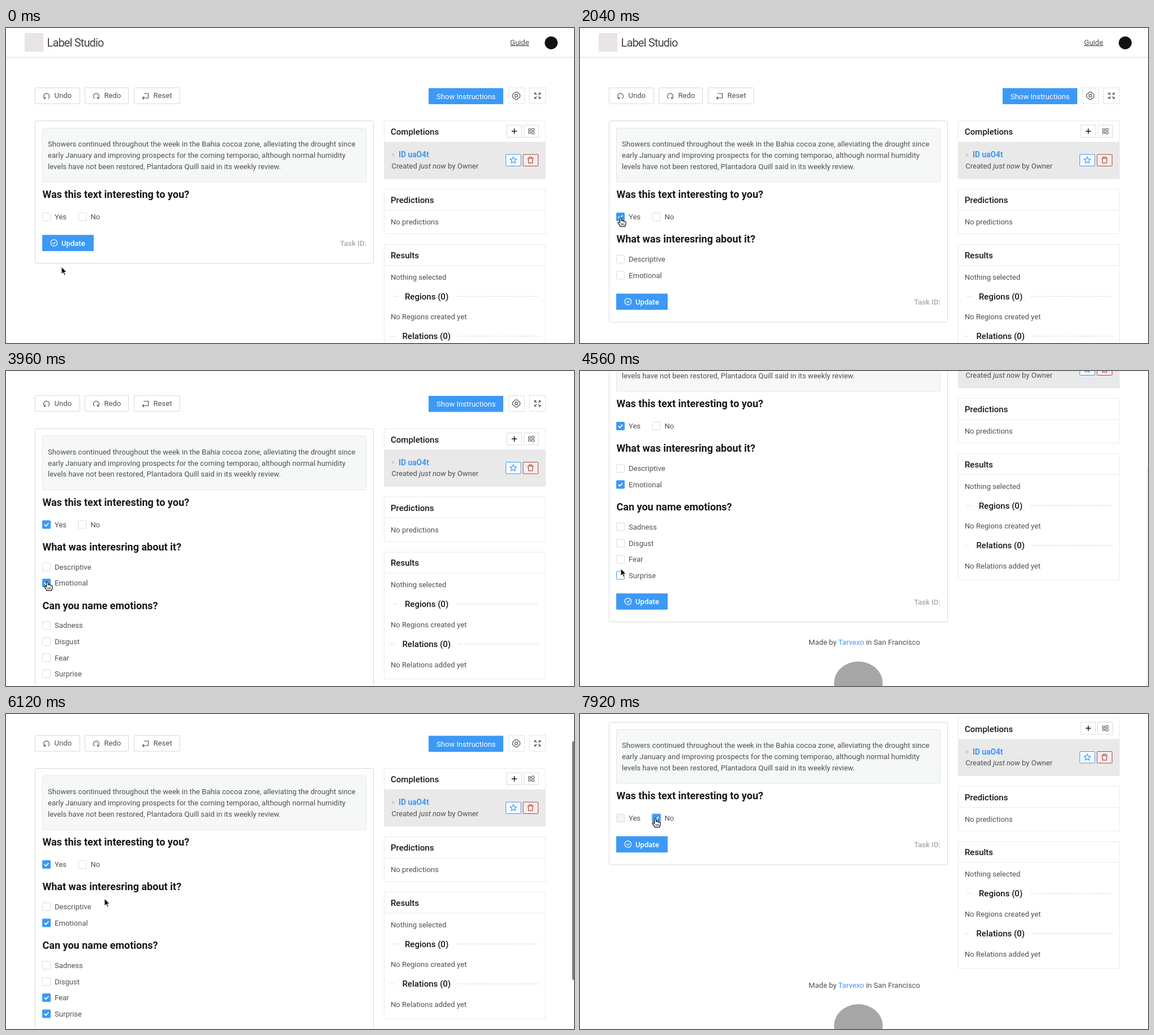
An HTML page for the animation above (8000 ms loop, 1004 px wide and 558 px high).

```html
<!DOCTYPE html>
<html lang="en">
<head>
<meta charset="utf-8">
<title>Text labeling</title>
<style>
  html, body { margin: 0; width: 100%; height: 100%; overflow: hidden; background: #fff; }
  svg { display: block; width: 1004px; height: 558px; font-family: Roboto, Inter, sans-serif; }
  path, line { fill: none; }
</style>
</head>
<body>
<svg id="stage" viewBox="0 0 1004 558"></svg>
<script>
const BLUE = '#3d99f6', INK = '#505050', DARK = '#181818', EDGE = '#dcdcdc', PALE = '#ebebeb', RED = '#b2473c';
const LOOP = 8000, STEP = 120, VIEW = 592;

// Drawing helpers; a text's y is the middle of its capitals.
const text = (x, y, str, { size = 13.07, fill = INK, weight = 400, extra = '' } = {}) =>
  `<text x="${x}" y="${y + size * .36}" font-size="${size}" fill="${fill}" font-weight="${weight}" ${extra}>${str}</text>`;
const title = (x, y, str) => text(x, y, str, { size: 15, fill: DARK, weight: 500 });
const question = (y, str) => text(64.5, y, str, { size: 18, fill: DARK, weight: 700 });
const rect = (x, y, w, h, fill = '#fff', stroke = 'none', extra = '') =>
  `<rect x="${x}" y="${y}" width="${w}" height="${h}" fill="${fill}" stroke="${stroke}" ${extra}/>`;
const icon = (x, y, d, stroke = INK, width = 1.2, extra = '') =>
  `<path transform="translate(${x} ${y})" d="${d}" stroke="${stroke}" stroke-width="${width}" ${extra}/>`;
const rule = (x1, x2, y, stroke = PALE, dash = '') =>
  `<line x1="${x1}" x2="${x2}" y1="${y}" y2="${y}" stroke="${stroke}" stroke-dasharray="${dash}"/>`;
const toolButton = (x, w, label, d) =>
  rect(x, 106, w, 28, '#fff', '#d6d6d6', 'rx="1"') + icon(x + 20, 120, d) + text(x + 34, 119.7, label);
const panel = (y, h, split, label) =>
  rect(668.5, y, 285, h, '#fff', PALE) + rule(669, 953, split) + title(680, (y + split) / 2 + .5, label);
const divider = (y, left, label, from, to) =>
  rule(left, left + 8, y, '#ccc', '3 2') + title(left + 21, y, label) + rule(from, to, y, '#d0d0d0', '3 2');

// label, box left, row centre, checked from, checked until, group
const OPTIONS = [
  ['Yes', 64.5, 334.5, 1440, 7800, ''],
  ['No', 128, 334.5, 7800, LOOP, ''],
  ['Descriptive', 64.5, 409.5, LOOP, LOOP, 'reason'],
  ['Emotional', 64.5, 438, 3720, 7800, 'reason'],
  ['Sadness', 64.5, 513, LOOP, LOOP, 'emotion'],
  ['Disgust', 64.5, 542, LOOP, LOOP, 'emotion'],
  ['Fear', 64.5, 570.5, 4800, 7800, 'emotion'],
  ['Surprise', 64.5, 599, 5280, 7800, 'emotion'],
].map(([label, x, y, on, off, group]) => ({ label, x, y, on, off, group }));

const choices = group => OPTIONS.filter(o => o.group === group).map(o =>
  `<g id="${o.label}">` +
  rect(o.x - 2.5, o.y - 9.5, 19, 19, BLUE, 'none', 'rx="2" opacity=".18" class="halo"') +
  rect(o.x, o.y - 7, 14, 14, '#fff', EDGE, 'rx="1" class="box"') +
  icon(o.x, o.y - 7, 'M3.3 7l2.8 2.8 4.7-5.3', '#fff', 1.8, 'class="tick"') +
  text(o.x + 21.5, o.y, o.label) + '</g>').join('');

const header =
  rule(0, 1004, 52, '#d4d4d4') + rule(0, 1004, 53, '#eee') +
  rect(33, 9, 33, 33, '#e8e5e4') +
  text(72.5, 26, 'Label Studio', { size: 20, fill: '#444', extra: 'letter-spacing="-.85"' }) +
  text(891, 25, 'Guide', { extra: 'text-decoration="underline"' }) +
  '<circle cx="963.7" cy="26.3" r="11.4" fill="#111"/>';

const toolbar =
  toolButton(51.5, 79, 'Undo', 'M-2.8 5A5 5 0 1 1 2.8 5M-5 5h2.8v-3') +
  toolButton(139.5, 77, 'Redo', 'M-2.8 5A5 5 0 1 1 2.8 5M5 5h-2.8v-3') +
  toolButton(226.5, 80.5, 'Reset', 'M-3-4H5V4H-5M-2.5 1.5L-5 4l2.5 2.5') +
  rect(747, 106.5, 132, 28.5, BLUE, 'none', 'rx="1"') +
  text(761, 120.8, 'Show Instructions', { fill: '#fff' }) +
  rect(888.5, 106, 28, 28, '#fff', '#d0d0d0', 'stroke-dasharray="3 2"') +
  icon(902, 120, 'M-2-6.5h4l.7 2 2 .5 1.8 2.3v3.4L4.7 4l-2 .5-.7 2h-4l-.7-2-2-.5-1.8-2.3v-3.4L-4.7-4l2-.5z' +
    'M0-2.4a2.4 2.4 0 1 1 0 4.8 2.4 2.4 0 0 1 0-4.8') +
  rect(925.5, 106, 28, 28, '#fff', '#d0d0d0', 'stroke-dasharray="3 2"') +
  icon(939.5, 120, 'M-5-2v-3h3M5-2v-3h-3M-5 2v3h3M5 2v3h-3M-5-5l3.5 3.5M5-5L1.5-1.5M-5 5l3.5-3.5M5 5L1.5 1.5');

const card =
  rect(51.5, 164.5, 598, 252.5, '#fff', '#d6d6d6', 'rx="3" id="card"') +
  rect(64.5, 177.5, 572, 95.5, '#f6f8f8', '#e3e6e6', 'rx="2"') +
  ['Showers continued throughout the week in the Bahia cocoa zone, alleviating the drought since',
   'early January and improving prospects for the coming temporao, although normal humidity',
   'levels have not been restored, Plantadora Quill said in its weekly review.',
  ].map((line, i) => text(74, 205.7 + i * 19.7, line)).join('') +
  question(295, 'Was this text interesting to you?') + choices('') +
  '<g id="reason">' + question(373.7, 'What was interesring about it?') + choices('reason') + '</g>' +
  '<g id="emotion">' + question(477.7, 'Can you name emotions?') + choices('emotion') + '</g>' +
  '<g id="actions">' +
  rect(64, 366.5, 91, 28.7, BLUE, 'none', 'rx="1"') +
  icon(84.8, 380.6, 'M0-5.8a5.8 5.8 0 1 1 0 11.6 5.8 5.8 0 0 1 0-11.6M-2.6 0l2 2.1 3.3-3.9', '#fff') +
  text(98, 381, 'Update', { fill: '#fff', weight: 500 }) +
  text(637, 381.7, 'Task ID:', { fill: '#a9a9a9', weight: 500, extra: 'text-anchor="end"' }) + '</g>';

const sidebar = '<g id="sidebar">' +
  panel(164.5, 102.5, 202, 'Completions') +
  rect(668, 202, 286, 65, '#e9e9e9') +
  rect(885.5, 172, 26, 21.5, '#fff', EDGE) + icon(898.5, 182.7, 'M-4.7 0H4.7M0-4.7V4.7', DARK, 1.5) +
  rect(915.5, 172, 26, 21.5, '#fff', EDGE) +
  icon(928.5, 182.7, 'M-5-4h4v3h-4zM1-4.8h4v3.8H1zM-5 1h4v3h-4zM1 1h4v3.8H1z', INK, 1) +
  '<circle cx="684" cy="224.7" r="2.6" fill="#d0d0d0"/>' +
  text(694, 224.5, 'ID uaO4t', { size: 13.8, fill: BLUE, weight: 700 }) +
  text(681.5, 244.2, 'Created <tspan font-style="italic">just now</tspan> by Owner') +
  rect(883.5, 224, 26.5, 20.5, '#f6faff', BLUE, 'rx="1"') +
  icon(896.7, 234, 'M0-5.6l1.7 3.5 3.9.5-2.9 2.7.8 3.9L0 3.1-3.5 5l.8-3.9-2.9-2.7 3.9-.5z', BLUE) +
  rect(914, 224, 26.5, 20.5, '#f3eeee', RED, 'rx="1"') +
  icon(927.2, 234, 'M-5.5-3H5.5M-2.5-3v-2.2h5V-3M-4-3l.5 8.2h7L4-3', RED) +
  panel(285.5, 79, 323, 'Predictions') + text(680, 343.5, 'No predictions') +
  panel(383.5, 224.5, 420.5, 'Results') + text(680, 441, 'Nothing selected') +
  divider(475.3, 684, 'Regions (0)', 797, 939) + text(680, 511.7, 'No Regions created yet') +
  divider(546, 679.5, 'Relations (0)', 799, 942) + text(680, 582.3, 'No Relations added yet') + '</g>';

const footer = '<g id="footer">' +
  text(502.5, 0, `Made by <tspan fill="${BLUE}">Tarvexo</tspan> in San Francisco`, { extra: 'text-anchor="middle"' }) +
  '<ellipse cx="492" cy="72" rx="43" ry="38" fill="#a6a6a6"/></g>';

const pointers =
  '<g id="arrow"><path d="M0 0V13L3 10.2l2.2 5 2-.9L5 9.4H9.2Z" style="fill:#111" stroke="#fff"/></g>' +
  '<g id="hand"><path d="M-1.4 1.3a1.4 1.4 0 0 1 2.8 0V5.5q2.6-.9 3 .8 2.4-.6 2.7 1 2.2-.3 2.2 1.4 0 4-2 7H-.8' +
  'Q-2 12.5-5 9.5q0-2 1.6-1.7l2 1.5Z" style="fill:#fff" stroke="#111" stroke-width="1.2"/>' +
  '<path d="M1 10v3.5M3.4 10v3.5M5.8 10v3.5" stroke="#111"/></g>';

const $ = id => document.getElementById(id);
$('stage').innerHTML = `<g id="page">${header + toolbar + card + sidebar + footer}</g>` +
  rect(1000.7, 0, 5, 0, '#555', 'none', 'id="bar" rx="2"') + pointers;

// Key lists hold [time, ...values].
const SCROLL = [[2040, 0], [2520, 62.5], [4080, 62.5], [4560, 237], [5400, 237], [6120, 68],
  [6360, 68], [6840, 177], [7200, 177], [7560, 157.5]];
const POINTER = [[240, 98, 423], [960, 72, 336], [2640, 72, 336], [3480, 73, 372], [4320, 73, 374],
  [4560, 72, 350], [4680, 72, 334], [4920, 72, 334], [5160, 72, 362], [5520, 72, 362],
  [6120, 174, 327], [6600, 174, 327], [7080, 92, 229], [7200, 92, 229], [7680, 133, 185]];
const BAR = [[2040, 0], [2160, .75], [2640, .75], [3000, 0], [3960, 0], [4080, .75], [4440, .6],
  [4560, .06], [4680, 0], [5400, 0], [5520, .75], [6720, .75], [6960, 0]];

function track(keys, t) {
  const next = keys.findIndex(k => k[0] > t);
  if (next < 1) return keys.at(next).slice(1);
  const a = keys[next - 1], b = keys[next];
  const u = (t - a[0]) / (b[0] - a[0]), ease = u * u * (3 - 2 * u);
  return a.slice(1).map((v, i) => v + (b[i + 1] - v) * ease);
}

const show = (node, on) => { node.style.display = on ? '' : 'none'; };
const move = (node, x, y) => node.setAttribute('transform', `translate(${x} ${y})`);
const parts = OPTIONS.map(o => {
  const g = $(o.label);
  return { box: g.querySelector('.box'), tick: g.querySelector('.tick'), halo: g.querySelector('.halo'),
    width: 24 + g.querySelector('text').getComputedTextLength() };
});

function render(t) {
  const [wanted] = track(SCROLL, t), [x, y] = track(POINTER, t);
  const open = { '': true, reason: t >= 1440 && t < 7800, emotion: t >= 3720 && t < 7800 };
  const grow = (open.reason ? 104 : 0) + (open.emotion ? 160.5 : 0);
  const footY = Math.max(630, 453 + grow);
  const scroll = Math.min(wanted, footY - 480);

  move($('page'), 0, -scroll);
  move($('sidebar'), 0, scroll - wanted); // not yet clamped when the page shrinks
  move($('actions'), 0, grow);
  move($('footer'), 0, footY);
  $('card').setAttribute('height', 252.5 + grow);
  show($('reason'), open.reason);
  show($('emotion'), open.emotion);

  let pointing = false;
  OPTIONS.forEach((o, i) => {
    const { box, tick, halo, width } = parts[i];
    const checked = t >= o.on && t < o.off, fading = t >= o.off && t < o.off + 240;
    const inRow = open[o.group] && x >= o.x && x <= o.x + width;
    const dy = Math.abs(y + scroll - o.y);
    pointing ||= inRow && dy <= 10;
    box.setAttribute('fill', checked ? BLUE : fading ? '#f1f4f4' : '#fff');
    box.setAttribute('stroke', checked || (inRow && dy <= 12.5) ? BLUE : EDGE);
    show(tick, checked);
    show(halo, checked && t - o.on < 240);
  });

  for (const [id, on] of [['arrow', !pointing], ['hand', pointing]]) {
    show($(id), on);
    move($(id), x, y);
  }

  const ratio = VIEW / (footY + 112);
  $('bar').setAttribute('y', scroll * ratio);
  $('bar').setAttribute('height', VIEW * ratio);
  $('bar').setAttribute('opacity', track(BAR, t)[0]);
}

const start = performance.now();
function tick() {
  const t = (performance.now() - start) % LOOP;
  render(Math.floor(t / STEP) * STEP);
  requestAnimationFrame(tick);
}
tick();
</script>
</body>
</html>
```
